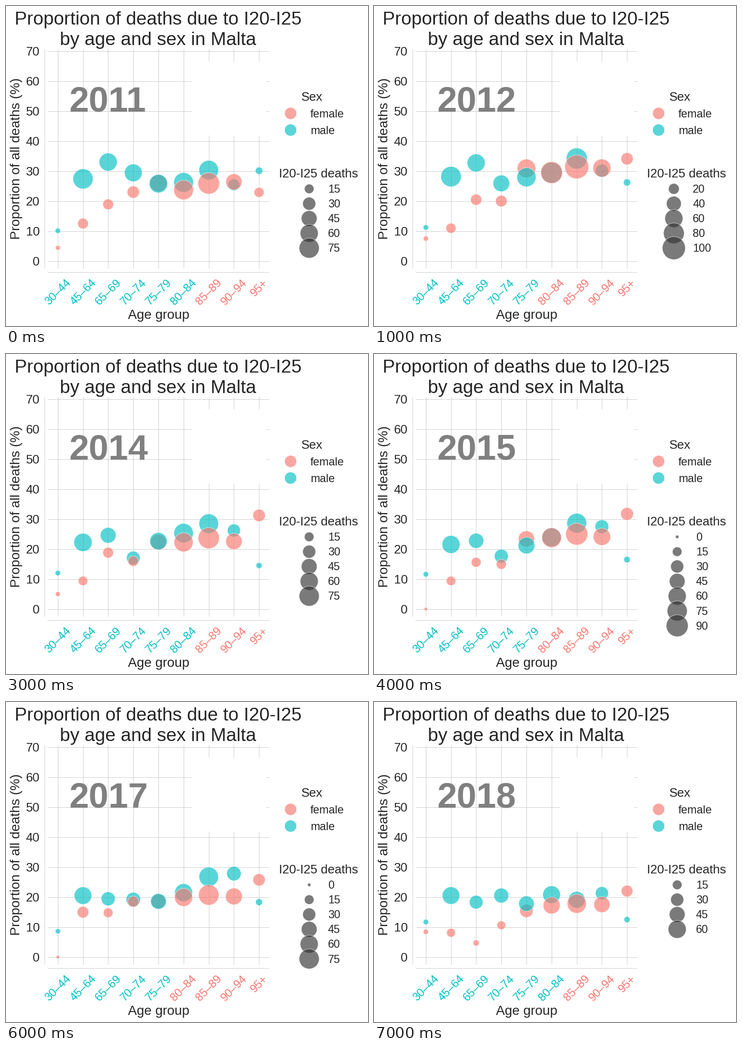
These frames come from a looping animation (760x672 px, 8 s). A matplotlib script:

```python
import math

import numpy as np
import matplotlib.pyplot as plt
from matplotlib.animation import FuncAnimation
from matplotlib.patches import Circle, Rectangle

W, H, DPI = 760, 672, 100
PT = 72 / DPI                      # points per pixel
INK, GRID = "#262626", "#cccccc"
AGES = ["30–44", "45–64", "65–69", "70–74", "75–79",
        "80–84", "85–89", "90–94", "95+"]
FIRST_YEAR, YEARS = 2011, 8
KEY_YEARS = [2011, 2013, 2018]
SWING_YEARS = [2011, 2012, 2013, 2015, 2017, 2018]


class Sex:
    """Shares follow key years plus a swing shared by younger or older ages."""

    def __init__(self, color, youngest, keys, old_from, swings, totals):
        self.color = color
        self.youngest = youngest
        self.keys = np.array(keys)
        self.old_from = old_from
        self.swings = swings
        self.totals = totals

    def share(self, year, age):
        if age == 0:
            return self.youngest[year - FIRST_YEAR]
        swing = self.swings[age >= self.old_from]
        return (np.interp(year, KEY_YEARS, self.keys[:, age - 1])
                + np.interp(year, SWING_YEARS, swing))

    def deaths(self, year, age):
        share = self.share(year, age)
        if age == 0:
            return math.sqrt(share)
        growth = 0.07 if age >= 7 else 0.02 if age == 6 else 0
        total = self.totals[age - 1] * (1 + growth * (year - FIRST_YEAR))
        return share / 100 * total


MALE = Sex(
    "#00BFC4",
    youngest=[10.1, 11.2, 64.4, 12, 11.6, 10, 8.6, 11.7],
    keys=[[27.4, 33.0, 29.4, 25.8, 26.2, 30.3, 25.4, 30.1],
          [22.9, 26.4, 16.4, 24.1, 26.7, 28.3, 24.9, 12.5],
          [20.5, 18.3, 20.5, 17.8, 20.8, 19.1, 21.3, 12.5]],
    old_from=6,
    swings=([0, 3, 0, -0.4, -0.5, 0], [0, 4.9, 0, 4, 5.8, 0]),
    totals=[275, 182, 195, 242, 275, 235, 95, 27])
FEMALE = Sex(
    "#F8766D",
    youngest=[4.4, 7.5, 0, 5, 0, 6, 0, 8.4],
    keys=[[12.5, 18.9, 23.0, 26.0, 23.7, 25.9, 26.4, 22.9],
          [9.4, 22.0, 17.0, 21.2, 20.7, 22.3, 21.0, 30.7],
          [8.1, 4.7, 10.6, 15.4, 17.2, 17.8, 17.5, 22.0]],
    old_from=4,
    swings=([0, 0, 0, 0.5, 6.6, 0], [0, 7.3, 0, 4.5, 2, 0]),
    totals=[156, 104, 115, 205, 303, 335, 180, 72])

fig = plt.figure(figsize=(W / DPI, H / DPI), dpi=DPI, facecolor="white")
ax = fig.add_axes([0, 0, 1, 1])
ax.set_xlim(0, W)
ax.set_ylim(H, 0)
ax.axis("off")


def x_of(age):
    return 108.85 + 52.8 * age


def y_of(share):
    return 535.6 - 6.3 * share


def radius(deaths):
    return math.sqrt(12 + 5.7 * deaths)


def text(x, y, s, size, color=INK, ha="left", **kw):
    return ax.text(x, y, s, fontsize=size * PT, color=color, ha=ha,
                   va="baseline", family="Liberation Sans", **kw)


def line(x0, y0, x1, y1):
    ax.plot([x0, x1], [y0, y1], color=GRID, lw=PT, zorder=1,
            solid_capstyle="butt")


def bubble(x, y, r, color):
    return ax.add_patch(Circle((x, y), r, fc=color, ec="white", lw=PT,
                               alpha=0.65, zorder=3))


def draw_static():
    text(319.5, 39, "Proportion of deaths due to I20-I25", 39, ha="center")
    text(319.5, 82, "by age and sex in Malta", 39, ha="center")

    for share in range(0, 71, 10):
        y = y_of(share)
        line(87, y, 552, y)
        text(70.5, y + 9, str(share), 26, ha="right")
    for age in range(len(AGES)):
        line(x_of(age), 90, x_of(age), 551)
    line(81, 90, 81, 551)
    line(87, 559, 552, 559)
    ax.add_patch(Rectangle((390, 116), 156, 156, fc="white", ec="none", zorder=2))

    text(320, 657, "Age group", 28, ha="center")
    text(29, 320.5, "Proportion of all deaths (%)", 28, ha="center",
         rotation=90, rotation_mode="anchor")

    text(642, 199, "Sex", 26, ha="center")
    for y, name, sex in ((225.5, "female", FEMALE), (260.5, "male", MALE)):
        bubble(597.5, y, 12.5, sex.color)
        text(639, y + 8.5, name, 23.6)
    text(656.5, 360, "I20-I25 deaths", 26, ha="center")


def age_label(age, color):
    size = 23.8
    width = 2.7 if len(AGES[age]) > 3 else 1.62
    half = (width + 0.7) * size * math.sqrt(0.5) / 2
    shift = 0.35 * size * math.sqrt(0.5)
    return text(x_of(age) - 1 + shift, 571 + half + shift, AGES[age], size,
                color, ha="center", rotation=45, rotation_mode="anchor")


def size_legend(counts):
    low, high = min(counts), max(counts)
    step = 20 if high >= 100 else 15
    ticks = [n for n in range(0, 121, step) if low <= n <= high]
    x = 629.5 if high >= 100 else 636.5
    parts = []
    for row, n in enumerate(ticks):
        y = 384 + 31.1 * row
        parts += [bubble(x, y, radius(n), "0.2"),
                  text(x + 39.5, y + 8, str(n), 23.3)]
    return parts


draw_static()
moving = []


def update(frame):
    while moving:
        moving.pop().remove()
    year = FIRST_YEAR + frame
    moving.append(text(132, 222, str(year), 74.5, "#808080", weight="bold"))

    counts = []
    for age, name in enumerate(AGES):
        # the male bubble lies on top in one group only
        order = (FEMALE, MALE) if name == "75–79" else (MALE, FEMALE)
        for sex in order:
            n = sex.deaths(year, age)
            counts.append(n)
            moving.append(bubble(x_of(age), y_of(sex.share(year, age)),
                                 radius(n), sex.color))
        leader = max((MALE, FEMALE), key=lambda sex: sex.deaths(year, age))
        moving.append(age_label(age, leader.color))
    moving.extend(size_legend(counts))
    return moving


anim = FuncAnimation(fig, update, frames=YEARS, interval=1000,
                     init_func=lambda: update(0), repeat=True,
                     repeat_delay=0, blit=False)
plt.show()
```
